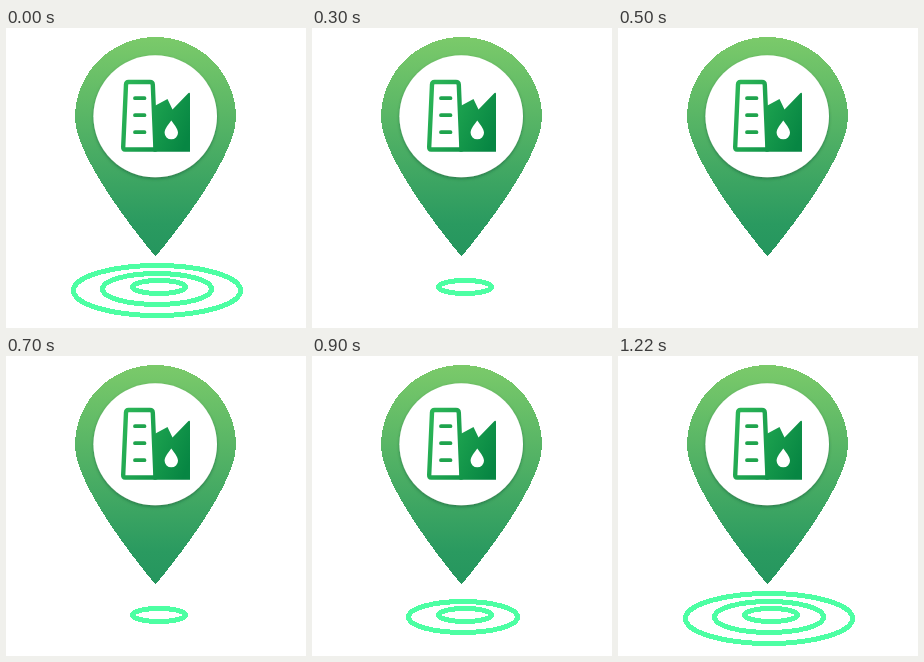
Write an HTML page that moves like this. It is 300 px wide and 300 px high and loops after 1300 ms.

```html
<!DOCTYPE html>
<html lang="en">
<head>
<meta charset="utf-8">
<title>Factory pin</title>
<style>
  html, body { margin: 0; width: 100%; height: 100%; overflow: hidden; background: #fff; }
  svg { display: block; width: 100vw; height: 100vh; }
</style>
</head>
<body>
<svg viewBox="0 0 300 300">
  <defs>
    <linearGradient id="pinFill" x1="0" y1="0" x2="0" y2="1">
      <stop offset="0" stop-color="#7bca6a"/>
      <stop offset=".85" stop-color="#2a9a60"/>
      <stop offset="1" stop-color="#25965e"/>
    </linearGradient>
    <linearGradient id="iconFill" gradientUnits="userSpaceOnUse" x1="115" y1="75" x2="184" y2="105">
      <stop offset="0" stop-color="#2ab456"/>
      <stop offset="1" stop-color="#078643"/>
    </linearGradient>
    <filter id="shadow" x="-10%" y="-10%" width="120%" height="120%">
      <feDropShadow dx="0" dy="1.5" stdDeviation="1.5" flood-color="#0b5030" flood-opacity=".5"/>
    </filter>
  </defs>

  <path fill="url(#pinFill)" shape-rendering="crispEdges" d="M149.5 9A80.5 80.5 0 0 1 230 89.5C230 134 149.500 228.500 149.500 228.500S69 134 69 89.500A80.500 80.500 0 0 1 149.500 9Z"/>
  <ellipse cx="149.200" cy="88.300" rx="61.800" ry="61" fill="#fff" filter="url(#shadow)"/>

  <g fill="none" stroke="url(#iconFill)" stroke-width="4.400" stroke-linejoin="round" stroke-linecap="round">
    <path d="M122.500 54H144Q146.600 54 146.800 56.600L149.500 121.500H119Q117 121.500 117.200 119L120 56.500Q120.200 54 122.500 54Z"/>
    <path stroke="#1fa44d" stroke-width="3.800" d="M129 70.200h9.500v.01M129 87.200h9.500v.01M129 104.200h9.500v.01"/>
  </g>
  <path fill="url(#iconFill)" d="M148.500 78L161.500 71L166.500 81.500L182.500 65Q184 64 184 66V123.700H147.500Z"/>
  <path fill="#fff" d="M165.300 92.500C167.500 96 172 100.500 172 104.800A6.700 6.500 0 0 1 158.600 104.800C158.600 100.500 163 96 165.300 92.500Z"/>

  <g id="rings" fill="none" stroke="#4dffa3" stroke-width="5" shape-rendering="crispEdges">
    <ellipse cx="153" cy="259" rx="26.500" ry="6.500"/>
    <ellipse cx="151" cy="261" rx="54.500" ry="15.500"/>
    <ellipse cx="151" cy="262.500" rx="83.500" ry="25"/>
  </g>
</svg>
<script>
  const LOOP = 1300, STEP = 200;
  const rings = [...document.getElementById("rings").children];
  const start = performance.now();

  // Rings vanish from the outside in, then return one by one.
  function draw(now) {
    const time = Math.max(0, now - start) % LOOP;
    const visible = Math.abs(3 - Math.floor((time + STEP / 2) / STEP));
    rings.forEach((ring, i) => ring.style.display = i < visible ? "" : "none");
    requestAnimationFrame(draw);
  }
  draw(start);
</script>
</body>
</html>
```
